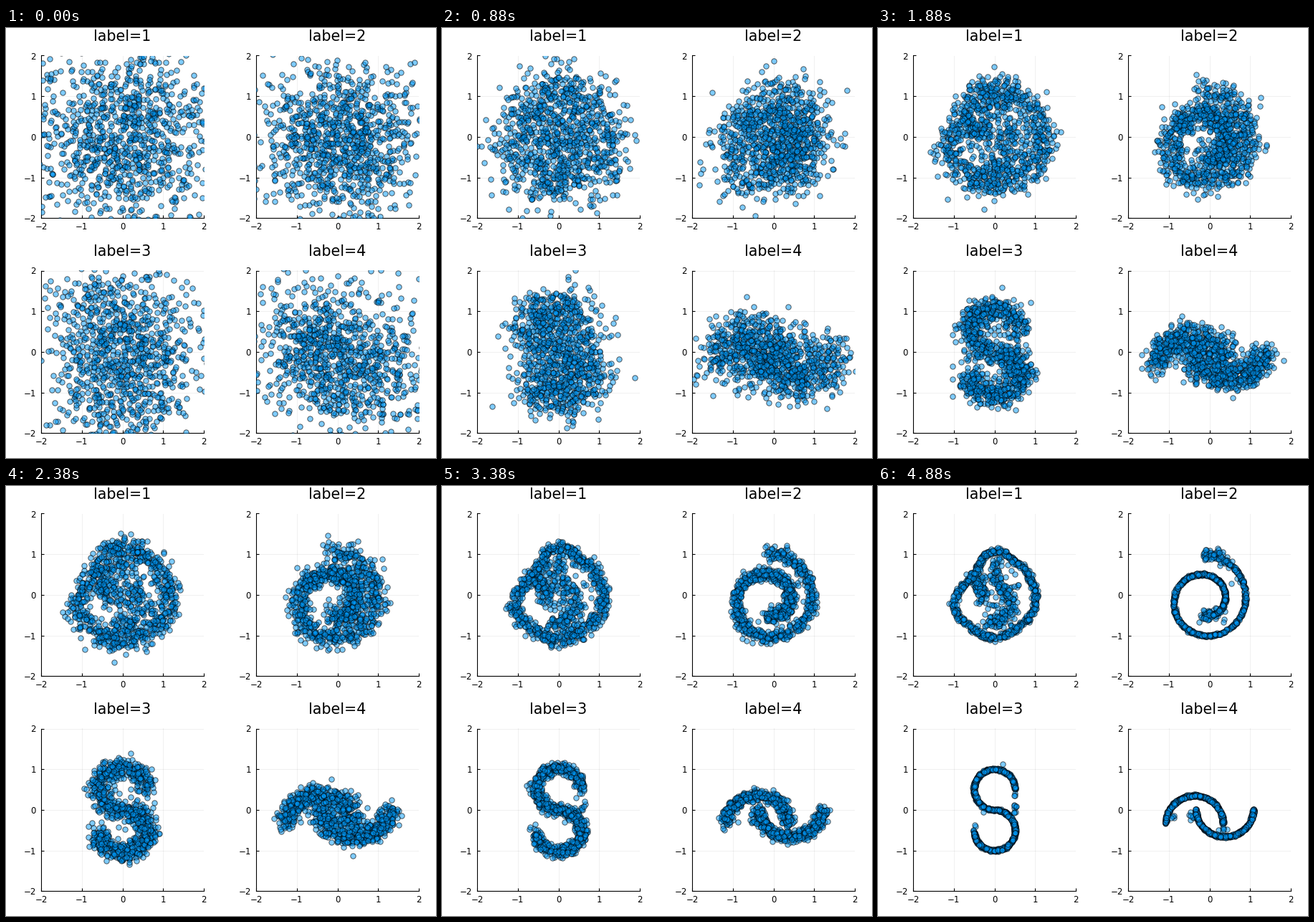
Animation of 600x600 px, one loop 6.26 s. Source, as a matplotlib script:

```python
import numpy as np
import matplotlib.pyplot as plt
from matplotlib.animation import FuncAnimation

SIZE, DPI = 600, 100
PX = 72 / DPI                 # points per pixel
STEPS, FRAMES, LOOP_MS = 40, 50, 6260
N = 1000
rng = np.random.default_rng(7)
plt.rcParams["font.family"] = "DejaVu Sans"


def along(nodes, n, jitter):
    """Points spread evenly along a polyline, with some scatter."""
    nodes = np.array(nodes, float)
    lengths = np.hypot(*np.diff(nodes, axis=0).T)
    dist = np.concatenate([[0], np.cumsum(lengths)])
    u = rng.uniform(0, dist[-1], n)
    pts = np.column_stack([np.interp(u, dist, c) for c in nodes.T])
    return pts + rng.normal(0, jitter, pts.shape)


def blob():
    rim = [(-1.02, -.2), (-.9, -.52), (-.58, -.8), (-.28, -.99), (.05, -1.05),
           (.44, -.9), (.75, -.64), (.97, -.32), (1.01, .04), (.9, .35),
           (.72, .65), (.44, .87), (.17, 1.05), (-.05, 1.07), (-.25, .98),
           (-.38, .74), (-.48, .52), (-.68, .32), (-.9, .1), (-1.02, -.2)]
    hook = [(0, .9), (.05, .3), (.3, .1), (.4, -.3), (.15, -.6), (-.2, -.7)]
    lobe = [(-.52, .36), (-.36, .3), (-.28, -.1)]
    return np.vstack([
        along(rim, 690, .03),
        along(hook, 160, .09),
        along(lobe, 90, .09),
        rng.uniform((-.45, -.85), (.6, .75), (60, 2)),
    ])


def spiral():
    t = np.pi * rng.uniform(1.5, 4.5, N - 30)
    pts = np.column_stack([t * np.cos(t), t * np.sin(t)]) * .0796 - .122
    # both ends of the roll are a little frayed
    fray = np.where((t > 4.3 * np.pi) | (t < 1.65 * np.pi), .06, .004)
    pts += rng.normal(size=pts.shape) * fray[:, None]
    return np.vstack([
        pts,
        along([(-.1, 1), (.35, 1.02)], 14, .07),
        along([(.4, -.3), (.1, -.5)], 10, .06),
        along([(.8, .1), (.45, .7)], 3, .05),
        along([(-.2, -.62), (.35, -.65)], 3, .07),
    ])


def s_curve():
    t = 3 * np.pi * rng.uniform(-.5, .5, N - 16)
    pts = np.column_stack([np.sin(t), np.sign(t) * (np.cos(t) - 1)]) / 2
    return np.vstack([
        pts,
        along([(.51, .48), (.48, -.12)], 12, .02),
        along([(-.5, -.45), (-.44, -.26)], 2, .02),
        [(.21, 1.12), (-.27, -.04)],
    ])


def moons():
    t = rng.uniform(0, np.pi, 490)
    arch = np.column_stack([-.37 - .7 * np.cos(t), -.34 + .69 * np.sin(t)])
    bowl = np.column_stack([.37 - .7 * np.cos(t), .02 - .68 * np.sin(t)])
    return np.vstack([
        arch, bowl,
        along([(-1, -.25), (-.8, -.08)], 5, .04),
        along([(-.48, -.2), (-.4, -.02)], 8, .05),
        along([(.2, -.55), (.38, -.45)], 7, .05),
    ])


# shape, widening in x and y while noisy, relative noise
PANELS = [(blob(), (.3, .25), 1.12), (spiral(), (.22, .13), 1.0),
          (s_curve(), (.36, .1), 1.0), (moons(), (.36, .02), 1.0)]

KNOTS = [0, 7, 11, 15, 23, 31, 39]
LEVELS = [.8, .35, .25, .175, .1, .05, .011]


def noise_level(step):
    return np.exp(np.interp(step, KNOTS, np.log(LEVELS)))


def noise_walk(keep=.97):
    """Slowly changing unit noise for every step."""
    walk = rng.normal(size=(STEPS, N, 2))
    for k in range(1, STEPS):
        walk[k] = keep * walk[k - 1] + np.sqrt(1 - keep ** 2) * walk[k]
    return walk


def trajectory(shape, widen, gain):
    shape = rng.permutation(shape)
    walk = noise_walk()
    path = []
    for k in range(STEPS):
        amount = (1 - k / (STEPS - 1)) * min(1, k / 9)
        path.append(shape * (1 + np.array(widen) * amount)
                    + gain * noise_level(k) * walk[k])
    return path


fig = plt.figure(figsize=(SIZE / DPI, SIZE / DPI), dpi=DPI, facecolor="white")


def make_panel(index):
    row, col = divmod(index, 2)
    left, bottom, side = 49.2 + 300 * col, 265.3 + 300 * row, 226.8
    ax = fig.add_axes([left / SIZE, 1 - bottom / SIZE, side / SIZE, side / SIZE])
    ax.set(xlim=(-2, 2), ylim=(-2, 2),
           xticks=range(-2, 3), yticks=range(-2, 3))
    ax.set_axisbelow(True)
    ax.grid(color="black", alpha=.06, linewidth=.72)
    ax.spines[["top", "right"]].set_visible(False)
    ax.spines[["left", "bottom"]].set_linewidth(1.1 * PX)
    ax.tick_params(direction="in", length=4 * PX, width=1.1 * PX,
                   labelsize=11.7 * PX)
    ax.tick_params(axis="x", pad=6 * PX)
    ax.tick_params(axis="y", pad=7.5 * PX)
    fig.text((left + side / 2) / SIZE, 1 - (18 + 300 * row) / SIZE,
             f"label={index + 1}", ha="center", va="baseline",
             fontsize=20.6 * PX)
    dots, = ax.plot([], [], "o", markersize=7.4 * PX,
                    markerfacecolor=(0, .604, .98, .5),
                    markeredgecolor=(0, 0, 0, .58),
                    markeredgewidth=1.05 * PX, zorder=4)
    return dots


clouds = [make_panel(i) for i in range(4)]
paths = [trajectory(*panel) for panel in PANELS]


def update(frame):
    step = min(frame, STEPS - 1)   # the last pose is held
    for dots, path in zip(clouds, paths):
        dots.set_data(*path[step].T)
    return clouds


anim = FuncAnimation(fig, update, frames=FRAMES, interval=LOOP_MS / FRAMES,
                     init_func=lambda: update(0), repeat=True, repeat_delay=0)
plt.show()
```
